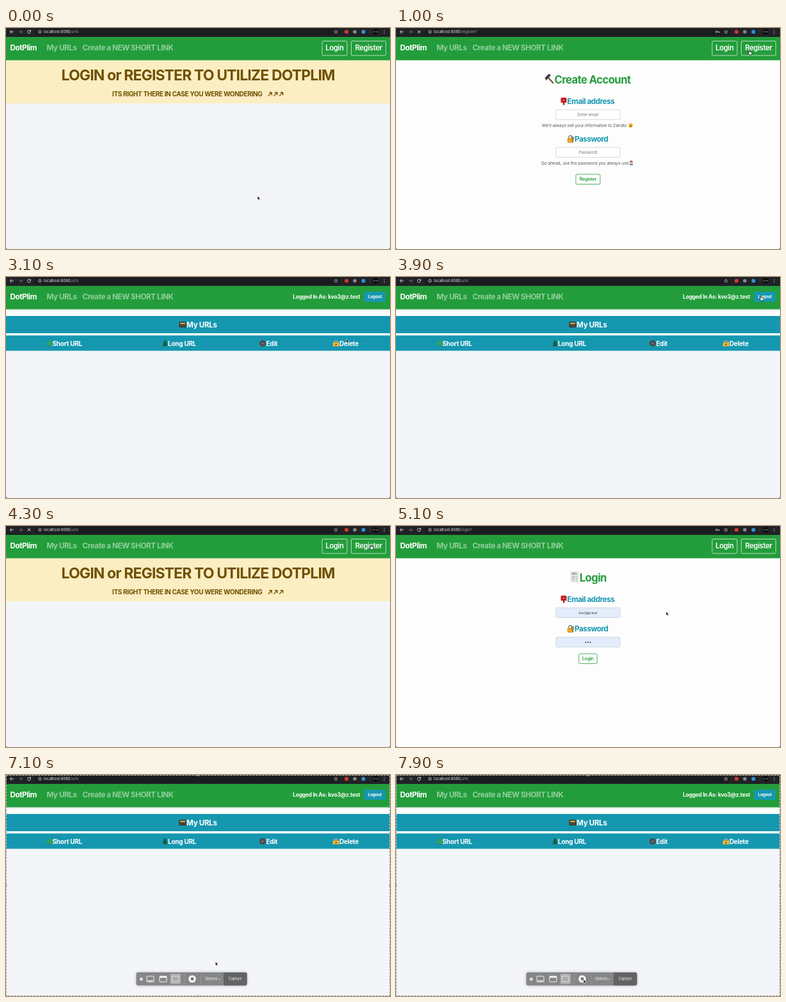
These frames come from a looping animation (600x346 px, 8 s). An HTML page with a canvas:

```html
<!DOCTYPE html>
<html lang="en">
<head>
<meta charset="utf-8">
<title>Short links</title>
<style>
html, body { margin: 0; width: 100%; height: 100%; overflow: hidden; background: #f3f5f8; }
canvas { display: block; width: 600px; height: 346px; }
</style>
</head>
<body>
<canvas id="stage"></canvas>
<script>
const canvas = document.getElementById('stage');
const c = canvas.getContext('2d');
const dpr = window.devicePixelRatio || 1;
canvas.width = 600 * dpr;
canvas.height = 346 * dpr;

const LOOP = 8000, STEP = 100;
const GREEN = '#239d3b', TEAL = '#1697b0', BROWN = '#705000';
const NAV_TOP = 14, NAV_END = 50.5;
const TIGHT = -0.038;
const EMAIL = 'kvo3@z.test';

// page shown from each time on
const PAGES = [[0, 'urls'], [1000, 'register'], [2600, 'list'], [4300, 'urls'], [4800, 'login'], [6200, 'list']];
const LOADING = [[900, 1100], [2500, 2700], [4200, 4400], [4700, 4900], [6100, 6300]];
// time, x, y of the pointer
const PATH = [
  [0, 393, 263], [200, 393, 263], [800, 553, 36], [1000, 553, 36], [1450, 306, 136], [1900, 306, 136],
  [2100, 302, 195], [2300, 302, 195], [2500, 301, 236], [2700, 301, 236], [3100, 532, 97], [3500, 571, 31],
  [4300, 571, 31], [4600, 513, 30], [4800, 513, 30], [5100, 422, 134], [5600, 303, 213], [6400, 303, 213],
  [7000, 330, 290], [7600, 293, 320], [8000, 293, 320]
];
const HAND = [[700, 1100], [2400, 2700], [3400, 4350], [4500, 4850], [5500, 6450]];

const within = (spans, t) => spans.some(([a, b]) => t >= a && t < b);
const clamp = v => Math.max(0, Math.min(1, v));

function text(s, x, y, size, color, weight = 600, align = 'left', track = -0.025) {
  c.font = `${weight} ${size}px Inter, "Noto Sans", sans-serif`;
  c.letterSpacing = track * size + 'px';
  c.textAlign = align;
  c.textBaseline = 'alphabetic';
  c.fillStyle = color;
  c.fillText(s, x, y);
}
const title = (s, x, y, size, color, align = 'left') => text(s, x, y, size, color, 700, align, TIGHT);

function rect(x, y, w, h, color) {
  c.fillStyle = color;
  c.fillRect(x, y, w, h);
}
function box(x, y, w, h, r, fill, stroke, line = 0.8) {
  c.beginPath();
  c.roundRect(x, y, w, h, r);
  if (fill) { c.fillStyle = fill; c.fill(); }
  if (stroke) { c.strokeStyle = stroke; c.lineWidth = line; c.stroke(); }
}
function dot(x, y, r, fill, stroke, line = 0.8) {
  c.beginPath();
  c.arc(x, y, r, 0, 7);
  if (fill) { c.fillStyle = fill; c.fill(); }
  if (stroke) { c.strokeStyle = stroke; c.lineWidth = line; c.stroke(); }
}
function draw(d, x, y, fill, stroke, line = 1) {
  const p = new Path2D(d);
  c.save();
  c.translate(x, y);
  c.lineJoin = 'round';
  if (fill) { c.fillStyle = fill; c.fill(p); }
  if (stroke) { c.strokeStyle = stroke; c.lineWidth = line; c.stroke(p); }
  c.restore();
}

function browserBar(path, loading, key) {
  rect(0, 0, 600, NAV_TOP, '#202225');
  draw('M3 0H-2.6M0 -2.7L-2.7 0L0 2.7', 9, 6, null, '#dfe1e4', 0.9);
  draw('M-3 0H2.6M0 -2.7L2.7 0L0 2.7', 23, 6, null, '#777a7e', 0.9);
  if (loading) {
    draw('M-2.2 -2.2L2.2 2.2M2.2 -2.2L-2.2 2.2', 36, 6, null, '#e4e6e8', 0.9);
  } else {
    draw('M2.1 -1.3A2.5 2.5 0 1 0 2.4 .7', 36, 6, null, '#dfe1e4', 0.9);
    draw('M2.9 -3V-.3H.2Z', 36, 6, '#dfe1e4');
  }
  box(45, 1, 477, 10.5, 5, '#1b1c1f');
  dot(53, 6, 2.3, null, '#dcdee0', 0.7);
  rect(52.7, 5.6, 0.7, 1.8, '#dcdee0');
  rect(52.7, 4.5, 0.7, 0.6, '#dcdee0');
  text('localhost:8080', 59, 8, 5.9, '#e9eaec', 400, 'left', 0);
  const w = c.measureText('localhost:8080').width;
  text(path, 59 + w, 8, 5.9, '#9a9da1', 400, 'left', 0);
  if (key) {
    dot(500.7, 6, 1.2, null, '#cfd1d4', 0.9);
    draw('M0 0H3.3V1.5M2 0V1.2', 502, 6, null, '#cfd1d4', 0.8);
  }
  draw('M0 -2.8L.8 -.9L2.8 -.8L1.2 .5L1.8 2.5L0 1.4L-1.8 2.5L-1.2 .5L-2.8 -.8L-.8 -.9Z', 515.5, 6, null, '#d2d4d7', 0.6);
  dot(532, 6, 3, '#d8392f');
  dot(545, 6, 2.8, '#85898e');
  dot(558.5, 6, 3.1, '#2f8fd5');
  rect(568, 3, 0.6, 6, '#4a4c50');
  dot(577.5, 6, 4.5, '#0c0d0e');
  text('dev lab', 577.5, 6.8, 2.3, '#a9abad', 500, 'center', 0);
  for (const y of [3.8, 6, 8.2]) dot(591, y, 0.6, '#d7d9dc');
}

function navBar(member) {
  rect(0, NAV_TOP, 600, NAV_END - NAV_TOP, GREEN);
  title('DotPlim', 6.5, 35.2, 11.7, '#fff');
  title('My URLs', 63.5, 35.2, 11.7, '#91cf9d');
  title('Create a NEW SHORT LINK', 119.5, 35.2, 11.7, '#91cf9d');
  if (member) {
    text('Logged In As: ' + EMAIL, 553, 33.5, 8.4, '#fff', 700, 'right');
    box(559.5, 23, 33.5, 16, 2, TEAL);
    text('Logout', 576.3, 33.4, 6.5, '#fff', 700, 'center');
  } else {
    box(494, 20.5, 39, 22.5, 1.5, null, '#d9eedd');
    text('Login', 513.3, 34.7, 11.3, '#fff', 600, 'center', -0.035);
    box(539.5, 20.5, 54, 22.5, 1.5, null, '#d9eedd');
    text('Register', 566.5, 34.7, 11.3, '#fff', 600, 'center', -0.035);
  }
}

function hammer(x, y) {
  draw('M-2.5 -2.5L6.5 7', x, y, null, '#75503a', 2.3);
  draw('M-7 -1L-1 -7.5L2.5 -6L-4.5 2.2Z', x, y, '#35393d', '#777', 0.5);
}
function postbox(x, y) {
  rect(x - 1, y + 1, 2.2, 5, '#84251f');
  box(x - 4.5, y - 5.5, 9, 8, 1.5, '#d51d22');
  rect(x - 2, y - 3, 4.5, 3.5, '#8c1218');
  rect(x - 1.2, y - 2, 2.5, 1.5, '#f0d8d4');
}
function lock(x, y) {
  draw('M-3.3 0V-2.5A2.8 2.8 0 0 1 2.3 -2.5V0', x, y, null, '#86857c', 1.4);
  box(x - 5, y - 1, 9, 6.5, 1, '#e5ac2c', '#a97718', 0.5);
  dot(x + 3, y - 1.5, 1.8, null, '#8d6420', 1.2);
  rect(x + 2.5, y, 1.2, 5, '#8d6420');
}
function face(x, y, r, mouth) {
  dot(x, y, r, '#f7c83b');
  dot(x - r * 0.38, y - r * 0.25, r * 0.16, '#553c15');
  dot(x + r * 0.38, y - r * 0.25, r * 0.16, '#553c15');
  dot(x, y + r * 0.42, r * mouth, '#86491d');
}
function facepalm(x, y) {
  box(x - 2.6, y + 1, 5.2, 2.6, 1, '#6d8eaa');
  dot(x, y - 1, 2.4, '#efc2a2');
  draw('M-2.6 -1.2A2.6 2.6 0 0 1 2.6 -1.2L1.6 -2.2H-1.6Z', x, y, '#4c3028');
  draw('M-.2 -1L3 2', x, y, null, '#dca37f', 1.3);
}
function receipt(x, y) {
  draw('M-5.5 -8H5.5V8L3.5 6.8L1.5 8L-.5 6.8L-2.5 8L-5.5 7Z', x, y, '#eeeeec', '#b9b9b7', 0.5);
  text('BILL', x, y - 4, 3.5, '#555', 700, 'center', 0);
  for (let i = 0; i < 4; i++) {
    rect(x - 4, y - 2 + i * 2.2, 5, 0.7, '#8b8b8a');
    rect(x + 2.4, y - 2 + i * 2.2, 1.6, 0.7, '#777');
  }
}
function leafy(x, y) {
  rect(x - 0.7, y + 2, 1.6, 3, '#7c5a36');
  draw('M1 -5.5L4.3 -1L3.5 3.2H-4L-4.5 0Z', x, y, '#31a354');
}
function pine(x, y) {
  rect(x - 0.8, y + 3, 1.6, 2.2, '#70462f');
  draw('M0 -5.5L2.6 -1.8H1.6L3.5 1H2L4.2 3.8H-4.2L-2 1H-3.5L-1.6 -1.8H-2.6Z', x, y, '#135c36');
}
function pager(x, y) {
  box(x - 5.5, y - 4.5, 11, 9, 1, '#37362f');
  rect(x - 4, y - 3, 8, 2.5, '#c7a85a');
  for (let i = 0; i < 3; i++) rect(x - 3.8 + i * 2.8, y + 1.4, 1.9, 1.3, '#93653c');
}
function disc(x, y) {
  dot(x, y, 5, '#344451', '#65737c', 0.6);
  dot(x, y, 2.7, null, '#87643e', 0.8);
  dot(x, y, 1, '#a5b4bc');
}
function scream(x, y) {
  face(x, y, 4.6, 0.3);
  draw('M-4 -2A4.5 4.5 0 0 1 4 -2Z', x, y, '#7999bd');
  box(x - 5, y + 0.5, 2.4, 4.5, 1, '#eeb52d');
  box(x + 2.6, y + 0.5, 2.4, 4.5, 1, '#eeb52d');
}

function guestPage() {
  rect(0, NAV_END, 600, 118 - NAV_END, '#fbeec2');
  title('LOGIN or REGISTER TO UTILIZE DOTPLIM', 300, 82.2, 23, BROWN, 'center');
  title('ITS RIGHT THERE IN CASE YOU WERE WONDERING', 166, 107.2, 10.1, BROWN);
  for (let i = 0; i < 3; i++) {
    draw('M-3 2.8L2.1 -2.3M-1.6 -2.7H2.5V1.6', 412.7 + i * 8.7, 103.7, null, BROWN, 1.3);
  }
}

function listPage() {
  rect(0, NAV_END, 600, 115 - NAV_END, '#fbfcfc');
  const shade = c.createLinearGradient(0, NAV_END, 0, 54);
  shade.addColorStop(0, '#d9e5dc');
  shade.addColorStop(1, '#fbfcfc');
  rect(0, NAV_END, 600, 3.5, shade);
  rect(0, 61, 600, 27, TEAL);
  rect(0, 91.5, 600, 24, TEAL);
  pager(276, 74.5);
  text('My URLs', 282, 78.8, 11.6, '#fff', 700);
  leafy(68, 104);
  pine(248.5, 104);
  disc(401, 104);
  scream(515.7, 104);
  const heads = [['Short URL', 72.5], ['Long URL', 253], ['Edit', 406.5], ['Delete', 521]];
  for (const [s, x] of heads) text(s, x, 107.8, 10, '#fff', 700);
}

function field(y, value, hint, filled, size = 6.5) {
  box(250, y, 100, 15.5, 2, filled ? '#e3ecfb' : '#fff', '#c6cbd1', 0.7);
  text(value || hint, 300, y + 7.8 + size * 0.36, size, value ? '#30353a' : '#747b82', 400, 'center');
}
function button(label, y, w) {
  box(300 - w / 2, y, w, 15.5, 2, '#fefefe', GREEN, 0.8);
  text(label, 300, y + 10.2, 7, GREEN, 600, 'center');
}
function formLabels(y2) {
  postbox(262, 114.5);
  title('Email address', 267.5, 118.6, 11.7, TEAL);
  lock(273, y2 - 4);
  title('Password', 279, y2, 11.7, TEAL);
}
const note = (s, x, y) => text(s, x, y, 6.75, '#555d65', 400, 'left', -0.02);

function registerPage(t) {
  rect(0, NAV_END, 600, 346 - NAV_END, '#fdfdfd');
  hammer(239.5, 79.5);
  title('Create Account', 247.5, 87, 16.8, GREEN);
  formLabels(177.8);
  const letters = Math.floor(EMAIL.length * clamp((t - 1500) / 400));
  const dots = Math.floor(3 * clamp((t - 2100) / 200));
  field(128, EMAIL.slice(0, letters), 'Enter email');
  note("We'll always sell your information to Zandlo", 228, 154.9);
  face(366.7, 152.5, 3.4, 0.35);
  field(187, '•'.repeat(dots), 'Password');
  note('Go ahead, use the password you always use', 227, 214);
  facepalm(367.5, 211.5);
  button('Register', 229, 38);
}

function loginPage() {
  rect(0, NAV_END, 600, 346 - NAV_END, '#fdfdfd');
  receipt(279, 80);
  title('Login', 286.7, 87, 16.8, GREEN);
  formLabels(165);
  field(128, EMAIL, '', true, 5.1);
  field(174, '•••', '', true, 6.5);
  button('Login', 200, 28.5);
}

function selection() {
  const edge = (color, offset) => {
    c.strokeStyle = color;
    c.lineWidth = 0.8;
    c.setLineDash([2.5, 2.5]);
    c.lineDashOffset = offset;
    c.strokeRect(0.5, 0.5, 599, 345);
  };
  c.save();
  edge('#f4f4f4', 0);
  edge('#77797b', 2.5);
  c.restore();
  for (const [x, y] of [[300, 0], [600, 173], [300, 346], [0, 173]]) dot(x, y, 1.7, '#8a8c8e', '#eee', 0.4);
}

function captureBar() {
  c.save();
  c.shadowColor = 'rgba(0,0,0,.25)';
  c.shadowBlur = 4 * dpr;
  box(203.5, 309, 173, 20.5, 3, '#858686');
  c.restore();
  box(340, 309, 36.5, 20.5, [0, 3, 3, 0], '#626363');
  dot(211.3, 319.4, 2.5, '#f1f1f1');
  draw('M-1 -1L1 1M1 -1L-1 1', 211.3, 319.4, null, '#777', 0.6);
  box(220, 315, 11, 9, 1, null, '#f5f5f5', 1);
  rect(221.5, 321.5, 8, 1.4, '#f5f5f5');
  box(240, 315, 11, 9, 1, null, '#f5f5f5', 1);
  rect(240, 315, 11, 2.5, '#f5f5f5');
  box(256.5, 311, 16.5, 16.5, 2, '#acadad');
  c.save();
  c.setLineDash([1.5, 1]);
  box(259.5, 315, 10.5, 8.7, 0, null, '#fff', 1);
  c.restore();
  rect(278, 311, 0.6, 16.5, '#a1a2a2');
  dot(291, 319.3, 5.8, '#f8f8f8');
  box(288.8, 317.1, 4.4, 4.4, 0.5, '#747575');
  rect(304, 311, 0.6, 16.5, '#a1a2a2');
  text('Options', 310.7, 321.4, 5.5, '#f6f6f6', 400, 'left', -0.01);
  draw('M-1.5 -.7L0 .8L1.5 -.7', 333.5, 319.8, null, '#f6f6f6', 0.8);
  text('Capture', 358, 321.4, 5.5, '#eee', 400, 'center', -0.01);
}

function pointer(t) {
  const i = PATH.findIndex(p => p[0] > t);
  const [t0, x0, y0] = PATH[i - 1], [t1, x1, y1] = PATH[i];
  const u = (t - t0) / (t1 - t0), e = u * u * (3 - 2 * u);
  const x = x0 + (x1 - x0) * e, y = y0 + (y1 - y0) * e;
  if (within(HAND, t)) {
    draw('M-1.3 -2.8Q-.5 -3.7 .2 -2.8V-.8L2.5 -.2Q3.4 .1 3.2 1.3L2.5 4H-1L-3 1.3Q-3 .2 -1.3 1Z', x, y + 2, '#fff', '#17191b', 0.8);
  } else {
    draw('M0 0V6.2L1.5 4.8L2.5 7L3.6 6.5L2.6 4.4H4.5Z', x, y, '#111', '#fff', 0.6);
  }
}

function render(t) {
  c.setTransform(dpr, 0, 0, dpr, 0, 0);
  rect(0, 0, 600, 346, '#f3f5f8');
  const page = PAGES.filter(p => p[0] <= t).pop()[1];
  const form = page === 'register' || page === 'login';
  if (page === 'urls') guestPage();
  if (page === 'list') listPage();
  if (page === 'register') registerPage(t);
  if (page === 'login') loginPage();
  navBar(page === 'list');
  browserBar(form ? `/${page}?` : '/urls', within(LOADING, t), form);
  draw('M0 -2.5Q0 0 2.5 0H0Z', 0, 346, '#222');
  draw('M0 -2.5Q0 0 -2.5 0H0Z', 600, 346, '#222');
  if (t >= 6800) {
    selection();
    captureBar();
  }
  pointer(t);
}

const start = performance.now();
function tick() {
  const t = (performance.now() - start) % LOOP;
  render(Math.floor(t / STEP) * STEP);
  requestAnimationFrame(tick);
}
tick();
</script>
</body>
</html>
```
